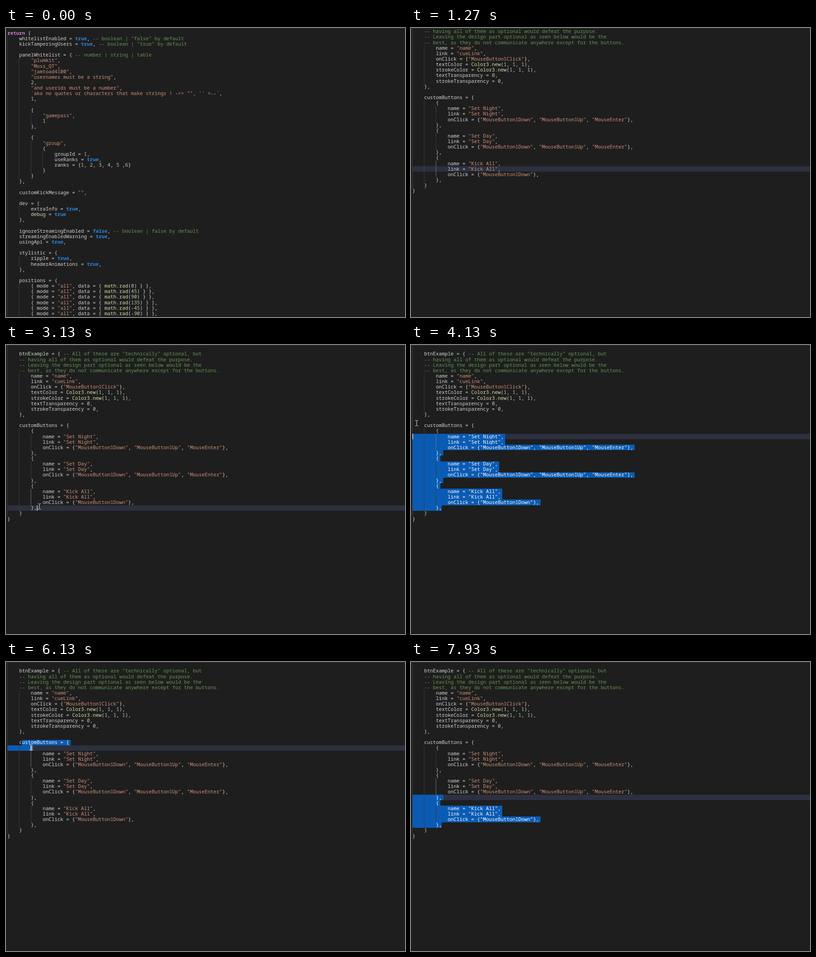
Write an HTML page with a canvas that moves like this. It is 878 px wide and 638 px high and loops after 8000 ms.

```html
<!DOCTYPE html>
<html>
<head>
<meta charset="utf-8">
<style>
  html, body { margin: 0; width: 100%; height: 100%; overflow: hidden; background: #1e1e1e; }
  canvas { display: block; }
</style>
</head>
<body>
<canvas id="stage" width="878" height="638"></canvas>
<script>
const W = 878, H = 638, LOOP = 8000, STEP = 1000 / 15;
const LEFT = 3, CHAR = 6.48, LINE = 12.14, PAD = 5, END_TOP = 13.7, BASELINE = 9.7;
const FONT = '10.8px "Noto Sans Mono", monospace';
const ctx = document.getElementById('stage').getContext('2d');

const angles = [0, 45, 90, 135, -45, -90, -135, 180]
  .map(a => `        { mode = "all", data = { math.rad(${a}) } },`).join('\n');

const button = (name, events) => `        {
            name = "${name}",
            link = "${name}",
            onClick = {${events.map(e => `"${e}"`).join(', ')}},
        },`;
const pressEvents = ['MouseButton1Down', 'MouseButton1Up', 'MouseEnter'];

const lines = `return {
    whitelistEnabled = true, -- boolean | "false" by default
    kickTamperingUsers = true, -- boolean | "true" by default

    panelWhitelist = { -- number | string | table
        "plumkit",
        "Moss_QT",
        "jamtoad4100",
        "usernames must be a string",
        2,
        "and userids must be a number",
        \`aka no quotes or characters that make strings ! ->> "", '' <--\`,
        1,

        {
            "gamepass",
            1
        },

        {
            "group",
            {
                groupId = 1,
                useRanks = true,
                ranks = {1, 2, 3, 4, 5 ,6}
            }
        }
    },

    customKickMessage = "",

    dev = {
        extraInfo = true,
        debug = true
    },

    ignoreStreamingEnabled = false, -- boolean | false by default
    streamingEnabledWarning = true,
    usingApi = true,

    stylistic = {
        ripple = true,
        headerAnimations = true,
    },

    positions = {
${angles}
    },

    sounds = {
        enabled = true,
        volume = 1,
    },

    colors = {
        header = Color3.new(1, 1, 1),
        body = Color3.new(0, 0, 0),
        accent = Color3.new(1, 0, 0),
    },

    tween = {
        time = 1,
        delay = 0,
        reverses = false,
    },

    btnExample = { -- All of these are "technically" optional, but
    -- having all of them as optional would defeat the purpose.
    -- Leaving the design part optional as seen below would be the
    -- best, as they do not communicate anywhere except for the buttons.
        name = "name",
        link = "cueLink",
        onClick = {"MouseButton1Click"},
        textColor = Color3.new(1, 1, 1),
        strokeColor = Color3.new(1, 1, 1),
        textTransparency = 0,
        strokeTransparency = 0,
    },

    customButtons = {
${button('Set Night', pressEvents)}
${button('Set Day', pressEvents)}
${button('Kick All', ['MouseButton1Down'])}
    }
}`.split('\n');

const BASE = lines.findIndex(l => l.includes('btnExample'));
const END_SCROLL = BASE * LINE + PAD - END_TOP;

const depths = [];
for (let i = lines.length - 1; i >= 0; i--) {
  depths[i] = lines[i] ? lines[i].search(/\S/) / 4 : depths[i + 1];
}

const TOKEN = /(--.*|`[^`]*`|"[^"]*"|\b(?:return|true|false|debug)\b|math\.rad|Color3\.new|\b\d+)/;

function tokenColor(s) {
  if (s.startsWith('--')) return '#639652';
  if (/^["`]/.test(s)) return '#ce9178';
  if (s === 'return') return '#c586c0';
  if (/^(true|false)$/.test(s)) return '#2b88e0';
  return /^\d/.test(s) ? '#b5cea8' : '#dcdcaa';
}

const tokens = lines.map(line => {
  let col = 0;
  return line.split(TOKEN).map((text, i) => {
    const token = {
      text, col,
      color: i % 2 ? tokenColor(text) : '#d4d4d4',
      bold: i % 2 && /^(return|true|false)$/.test(text)
    };
    col += text.length;
    return token;
  });
});

// Keys are [time, ...values]
function track(keys, t) {
  const i = keys.findIndex(k => k[0] > t);
  if (i < 0) return keys[keys.length - 1].slice(1);
  if (i === 0) return keys[0].slice(1);
  const a = keys[i - 1], b = keys[i], p = (t - a[0]) / (b[0] - a[0]);
  return a.slice(1).map((v, j) => v + (b[j + 1] - v) * p);
}

const scrollKeys = [
  [740, 0], [1260, END_SCROLL + 2 * LINE], [1280, END_SCROLL + 2 * LINE],
  [1400, END_SCROLL + 4 * LINE], [1600, END_SCROLL + 2 * LINE], [1860, END_SCROLL]
];

const mouseKeys = [
  [2130, 838, 434], [2530, 300, 340], [2730, 36, 303], [2930, 73, 356],
  [3180, 73, 356], [3800, 3, 265], [4070, 0, 178], [4320, 46, 155],
  [4400, 46, 155], [4600, -8, 60], [4665, -8, 32], [4730, -8, 20],
  [5010, -8, 20], [5065, 0, 230], [5400, 119, 316], [5860, 35, 179],
  [6000, 35, 179], [6730, 139, 231], [6795, 139, 229], [6900, 139, 229],
  [6930, 138, 231], [7270, 138, 231], [7330, 125, 260], [7460, 72, 358],
  [7600, 72, 358], [7930, -8, 303]
];

const drags = [[2995, 3990], [4325, 4740], [5925, 6940], [7460, 8000]];
const caretOff = [[1000, 1500], [2130, 2600], [4720, 4920], [5430, 5920], [7060, 7460], [7920, 8000]];

function cellAt(t) {
  const [x, y] = track(mouseKeys, t);
  const row = BASE + Math.floor((y - END_TOP) / LINE);
  const col = Math.max(0, Math.min(lines[row].length, Math.round((x - LEFT) / CHAR)));
  return { row, col };
}

function selectionAt(t) {
  const drag = drags.filter(d => d[0] <= t).pop();
  if (!drag) {
    const rest = { row: BASE + 26, col: 7 };
    return { anchor: rest, head: rest };
  }
  return { anchor: cellAt(drag[0]), head: cellAt(Math.min(t, drag[1])) };
}

const colX = col => LEFT + col * CHAR;

function rect(color, x, y, w, h) {
  ctx.fillStyle = color;
  ctx.fillRect(x, y, w, h);
}

function drawLine(row, y, color) {
  for (const tok of tokens[row]) {
    if (!tok.text.trim()) continue;
    ctx.font = (tok.bold ? 'bold ' : '') + FONT;
    ctx.fillStyle = color || tok.color;
    ctx.fillText(tok.text, colX(tok.col), y + BASELINE);
  }
}

function drawSelected(row, y, from, to) {
  const start = row === from.row ? colX(from.col) : LEFT;
  const end = row === to.row ? colX(to.col) : colX(lines[row].length) + 3.5;
  if (end <= start) return;
  ctx.save();
  ctx.beginPath();
  ctx.rect(start, Math.round(y), end - start, Math.round(y + LINE) - Math.round(y));
  ctx.clip();
  rect('#0a5bb3', start, y - 1, end - start, LINE + 2);
  drawLine(row, y, '#ffffff');
  ctx.restore();
}

// The guide of the block that holds the caret
function activeGuide(row) {
  const near = [row, row - 1, row + 1].filter(r => lines[r]);
  const depth = Math.max(...near.map(r => depths[r]));
  let first = near.find(r => depths[r] === depth), last = first;
  while (depths[first - 1] >= depth) first--;
  while (depths[last + 1] >= depth) last++;
  return { level: depth - 1, first, last };
}

function drawMouse(x, y) {
  x = Math.round(x);
  y = Math.round(y);
  const color = '#d6d6d6';
  rect(color, x, y - 5, 1, 11);
  for (const edge of [y - 6, y + 6]) {
    rect(color, x - 3, edge, 3, 1);
    rect(color, x + 1, edge, 3, 1);
  }
}

function draw(t) {
  const [scroll] = track(scrollKeys, t);
  const { anchor, head } = selectionAt(t);
  const forward = anchor.row < head.row || (anchor.row === head.row && anchor.col <= head.col);
  const [from, to] = forward ? [anchor, head] : [head, anchor];
  const guide = activeGuide(head.row);
  const rowY = row => PAD + row * LINE - scroll;

  rect('#1e1e1e', 0, 0, W, H);
  ctx.save();
  ctx.beginPath();
  ctx.rect(0, 2, W, H - 2);
  ctx.clip();

  const top = rowY(head.row);
  rect('#2c303f', LEFT, Math.round(top), W - LEFT, Math.round(top + LINE) - Math.round(top));

  for (let row = 0; row < lines.length; row++) {
    const y = rowY(row);
    if (y < -LINE || y > H) continue;
    drawLine(row, y);
    if (row >= from.row && row <= to.row) drawSelected(row, y, from, to);
    for (let level = 0; level < depths[row]; level++) {
      const lit = level === guide.level && row >= guide.first && row <= guide.last;
      const y0 = Math.round(y);
      rect(lit ? '#747474' : '#3e3e3e', colX(level * 4) - 0.5, y0, 1, Math.round(y + LINE) - y0);
    }
  }

  if (!caretOff.some(([a, b]) => t >= a && t < b)) {
    rect('#d8d8d8', colX(head.col), Math.round(top), 1.5, 12);
  }
  if (t >= mouseKeys[0][0]) drawMouse(...track(mouseKeys, t));
  ctx.restore();

  rect('#303030', 0, 0, W, 1);
  rect('#191919', 0, H - 1, W, 1);
}

const began = performance.now();
function tick() {
  const t = (performance.now() - began) % LOOP;
  draw(Math.floor(t / STEP + 0.1) * STEP);
  requestAnimationFrame(tick);
}
tick();
</script>
</body>
</html>
```
